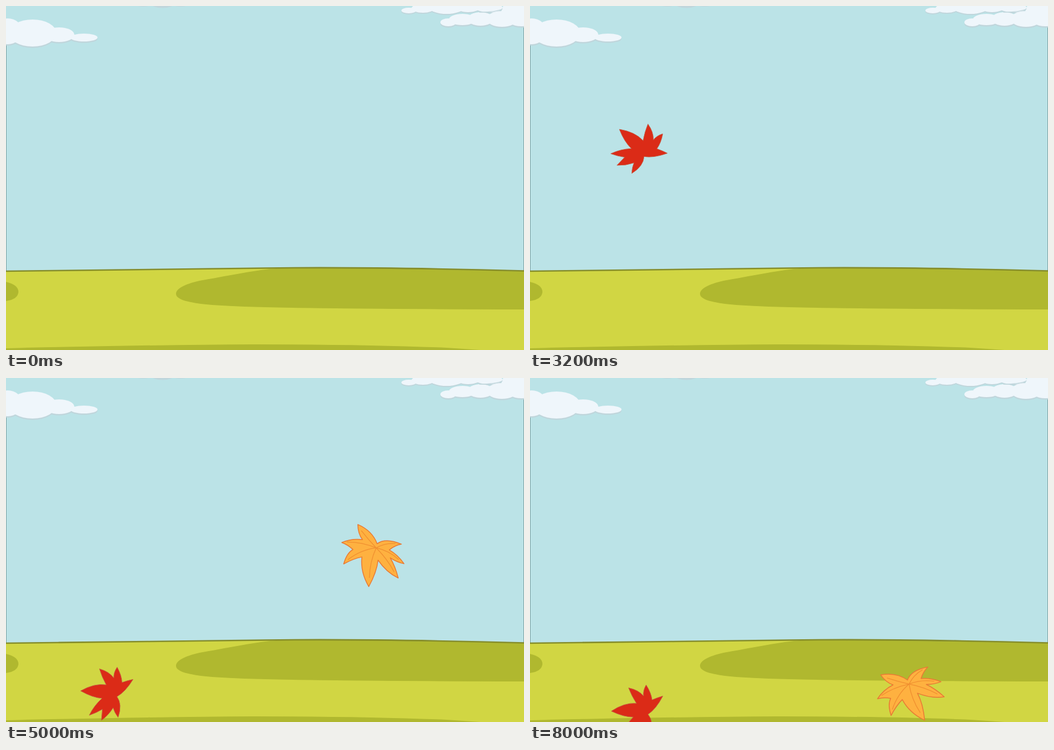
These frames come from a looping animation (917 by 611 pixels, 8.04 s). An HTML page:

```html
<!DOCTYPE html>
<html lang="en">
<head>
<meta charset="utf-8">
<title>Falling leaves</title>
<style>
html, body { margin: 0; width: 100%; height: 100%; overflow: hidden; background: #bbe3e7; }
svg { display: block; width: 100%; height: 100%; }
.edge { fill: #7b9fa2; }
.shade { fill: #b0b82f; }
.cloud { fill: #eff6fb; }
.under { fill: #c0d6dc; }
.red { fill: #db2b17; stroke: #c45a40; stroke-width: .9; }
.gold { fill: #feb140; stroke: #e87a35; stroke-width: 1.5; stroke-linejoin: round; }
.veins { fill: none; stroke: #f08f30; stroke-width: 1.3; }
</style>
</head>
<body>
<svg viewBox="0 0 917 611" preserveAspectRatio="none">
  <defs>
    <g id="left">
      <ellipse cx="3" cy="45" rx="26" ry="23"/>
      <ellipse cx="47" cy="48" rx="42" ry="24"/>
      <ellipse cx="94" cy="51" rx="27" ry="13"/>
      <ellipse cx="138" cy="56" rx="24" ry="7"/>
    </g>
    <g id="high">
      <ellipse cx="713" cy="8" rx="13" ry="5"/>
      <ellipse cx="738" cy="4" rx="20" ry="8"/>
      <ellipse cx="780" cy="3" rx="30" ry="11"/>
      <ellipse cx="818" cy="2" rx="22" ry="9"/>
      <ellipse cx="855" cy="3" rx="24" ry="8"/>
    </g>
    <g id="low">
      <ellipse cx="783" cy="29" rx="14" ry="7"/>
      <ellipse cx="808" cy="24" rx="24" ry="10"/>
      <ellipse cx="840" cy="23" rx="23" ry="12"/>
      <ellipse cx="878" cy="23" rx="27" ry="14"/>
      <ellipse cx="912" cy="18" rx="28" ry="18"/>
      <path d="M880 0H917V30H870Z"/>
    </g>
  </defs>

  <rect width="917" height="611" fill="#bbe3e7"/>
  <rect class="edge" y="70" width="1" height="401"/>
  <rect class="edge" x="916" y="38" width="1" height="432"/>

  <g class="under">
    <ellipse cx="243" cy="-2" rx="12" ry="3"/>
    <ellipse cx="277" cy="-4" rx="20" ry="7.5"/>
    <ellipse cx="309" cy="-2" rx="14" ry="3"/>
    <use href="#left" y="2.5"/>
    <use href="#high" y="2"/>
    <use href="#low" y="2.5"/>
  </g>
  <g class="cloud">
    <use href="#left"/>
    <use href="#low"/>
    <use href="#high"/>
  </g>
  <path d="M838 11Q868 11 879 5" fill="none" stroke="#c0d6dc" stroke-width="1.3"/>

  <path d="M0 471Q250 468 460 465.500Q640 463 917 470.500V611H0Z" fill="#d1d643"/>
  <path class="shade" d="M484 465.500Q660 464 917 470.500V539Q560 538 460 535Q380 533 345 529C316 525 301 520 301 511C301 502 317 493 348 487C400 478 440 469 484 465.500Z"/>
  <path class="shade" d="M0 490Q22 495 22 508Q21 521 0 524Z"/>
  <path class="shade" d="M0 608Q240 602 440 601Q640 601 780 607L840 611H0Z"/>
  <path d="M0 471Q250 468 460 465.500Q640 463 917 470.500" fill="none" stroke="#858d2c" stroke-width="2.600"/>

  <g id="red">
    <path class="red" transform="translate(-254.3 -90.7)" d="M222 60Q250 63 265 78Q267 62 272 48Q283 62 283 76Q288 68 299 64Q297 80 290 91Q300 94 309 98Q285 108 268 106Q268 123 248 137Q248 126 251 118Q236 124 221 124Q228 116 234 109Q222 108 209 104Q226 95 245 93Q232 82 222 60Z"/>
  </g>
  <g id="gold">
    <g transform="translate(-727.3 -109.1)">
      <path class="gold" d="M711 46Q734 62 738 86Q755 78 780 95Q768 95 757 101Q770 112 778 130Q766 125 756 115Q762 132 763 153Q745 140 734 115Q728 135 709 158Q699 130 707 104Q692 104 673 110Q682 92 694 88Q687 78 677 72Q695 68 714 74Q708 62 711 46Z"/>
      <path class="veins" d="M735 93Q724 76 715 58M735 93Q752 87 770 92M735 93Q756 102 770 121M735 93Q751 117 758 141M735 93Q719 115 713 143M735 93Q708 91 682 104M735 93Q710 77 686 73"/>
    </g>
  </g>
</svg>
<script>
const LOOP = 8040, STEP = 40;

// keys: [time, x, y, angle]
const leaves = [
  { el: document.getElementById("red"), keys: [
    [1700, 340, -58, -14],
    [2440, 254.3, 90.7, 0.5],
    [3200, 188.9, 251.4, 3],
    [4000, 152, 415.6, -16.5],
    [5000, 176.3, 561.6, -36],
    [5750, 188.5, 594.5, -40]
  ] },
  { el: document.getElementById("gold"), keys: [
    [3010, 832, -92, -19],
    [4000, 727.3, 109.1, 0],
    [5000, 650.9, 319, -11],
    [5350, 640.5, 388, -20],
    [6280, 663.7, 524, -39.7],
    [7080, 677, 560.4, -45]
  ] }
];

function slope(keys, i, c) {
  const last = keys.length - 1;
  const rate = j => (keys[j + 1][c] - keys[j][c]) / (keys[j + 1][0] - keys[j][0]);
  if (i === last) return 0;
  if (i === 0) return rate(0);
  const before = keys[i][0] - keys[i - 1][0];
  const after = keys[i + 1][0] - keys[i][0];
  return (rate(i - 1) * after + rate(i) * before) / (before + after);
}

// Smooth cubic through the keys
function valueAt(keys, t, c) {
  const last = keys.length - 1;
  if (t <= keys[0][0]) return keys[0][c];
  if (t >= keys[last][0]) return keys[last][c];
  let i = 0;
  while (t >= keys[i + 1][0]) i++;
  const span = keys[i + 1][0] - keys[i][0];
  const u = (t - keys[i][0]) / span, v = 1 - u;
  return v * v * (1 + 2 * u) * keys[i][c] + u * u * (3 - 2 * u) * keys[i + 1][c]
    + span * u * v * (v * slope(keys, i, c) - u * slope(keys, i + 1, c));
}

function draw(t) {
  for (const { el, keys } of leaves) {
    const [x, y, a] = [1, 2, 3].map(c => valueAt(keys, t, c).toFixed(2));
    el.setAttribute("transform", `translate(${x} ${y}) rotate(${a})`);
    el.setAttribute("visibility", t < keys[0][0] ? "hidden" : "visible");
  }
}

const start = performance.now();
function tick() {
  const t = (performance.now() - start) % LOOP;
  draw(Math.floor(t / STEP) * STEP);
  requestAnimationFrame(tick);
}
draw(0);
requestAnimationFrame(tick);
</script>
</body>
</html>
```
